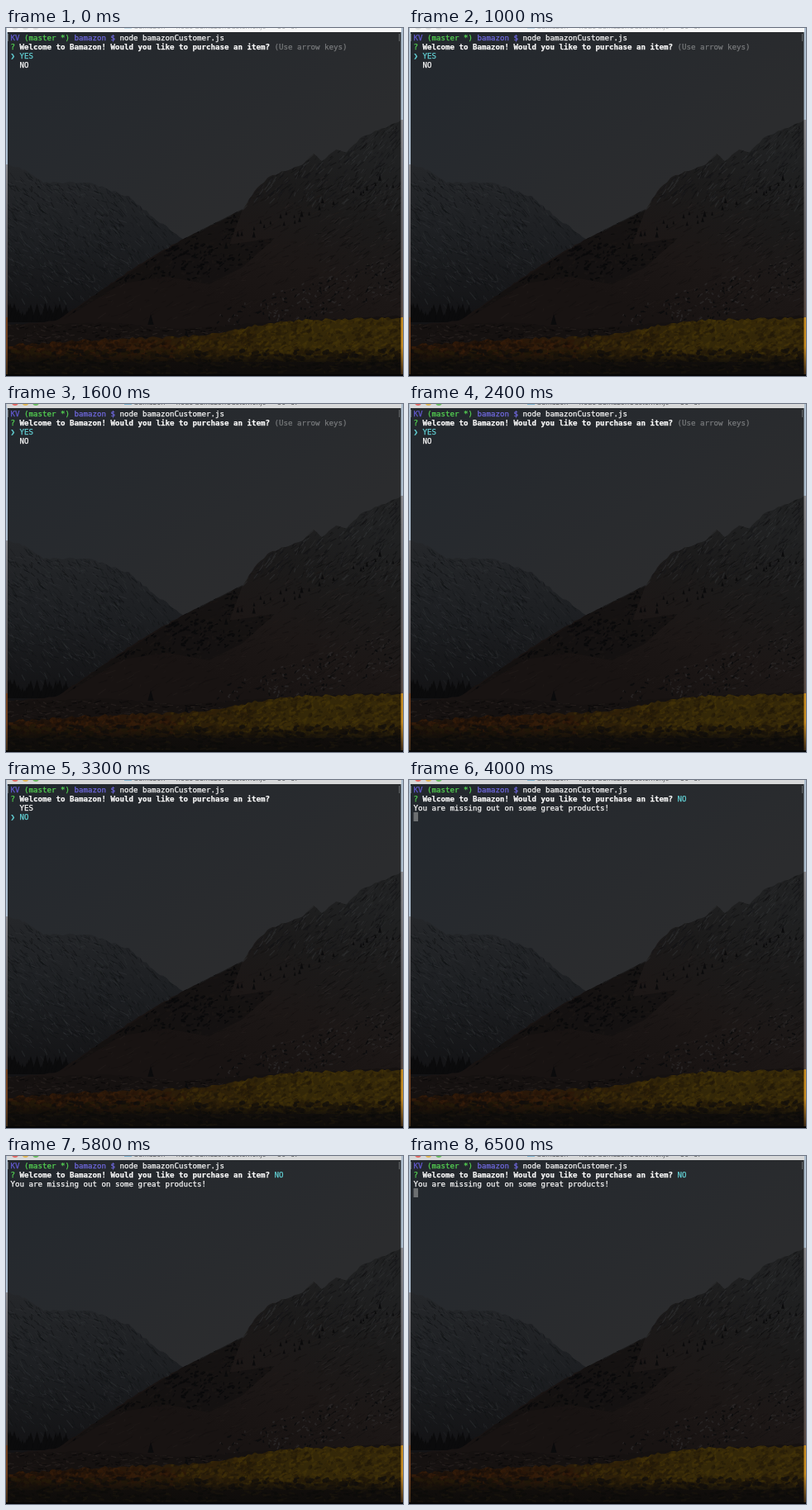
An HTML page with a canvas for the animation above (6.6 s loop, 480x421 px).

```html
<!DOCTYPE html>
<html lang="en">
<head>
<meta charset="utf-8">
<title>Terminal prompt</title>
<style>
html, body { margin: 0; width: 100%; height: 100%; overflow: hidden; background: #000; }
canvas { display: block; width: 480px; height: 421px; }
</style>
</head>
<body>
<canvas id="stage" width="480" height="421"></canvas>
<script>
const W = 480, H = 421, LOOP = 6600;
const FOCUSED = 1500, SELECT_NO = 2800, ANSWERED = 3600, BLINK = 1200;
const LEFT = 5.5, COL = 5.5, ROW = 11;
const GREEN = '#55d552', CYAN = '#62cfd3', WHITE = '#f8f8f8', GREY = '#77797b', VIOLET = '#7069e0';

const stage = document.getElementById('stage').getContext('2d');
const backdrop = document.createElement('canvas');
backdrop.width = W;
backdrop.height = H;
const art = backdrop.getContext('2d');

let seed = 11;
function random() {
  seed = (seed * 16807) % 2147483647;
  return seed / 2147483647;
}
const between = (a, b) => a + random() * (b - a);
const pick = list => list[Math.floor(random() * list.length)];

// A linear gradient with evenly spaced colours.
function blend(x0, y0, x1, y1, ...colors) {
  const gradient = art.createLinearGradient(x0, y0, x1, y1);
  colors.forEach((color, i) => gradient.addColorStop(i / (colors.length - 1), color));
  return gradient;
}

// Land below a jagged line through a few key points.
function land(keyPoints, roughness, floor = H) {
  const keys = keyPoints.split(' ').map(p => p.split(',').map(Number));
  const path = new Path2D();
  keys.forEach(([x, y], i) => {
    path.lineTo(x, y);
    const [nextX, nextY] = keys[i + 1] || [x, y];
    for (let px = x + 4; px < nextX; px += 4) {
      const t = (px - x) / (nextX - x);
      path.lineTo(px, y + (nextY - y) * t + between(-roughness, roughness));
    }
  });
  path.lineTo(W, floor);
  path.lineTo(0, floor);
  path.closePath();
  return path;
}

// Random strokes or dabs inside a box, clipped to a path.
function scatter(path, [x0, y0, x1, y1], count, colors, dx, dy, width) {
  art.save();
  art.clip(path);
  art.lineCap = 'round';
  for (let i = 0; i < count; i++) {
    const x = between(x0, x1), y = between(y0, y1), length = between(0.2, 1);
    art.strokeStyle = pick(colors);
    art.lineWidth = width * between(0.4, 1);
    art.beginPath();
    art.moveTo(x, y);
    art.lineTo(x + dx * length + between(-2, 2), y + dy * length + between(-2, 2));
    art.stroke();
  }
  art.restore();
}

function fir(x, base, height) {
  art.fillStyle = '#0b0b0c';
  art.beginPath();
  art.moveTo(x, base - height);
  art.lineTo(x + height * 0.28, base);
  art.lineTo(x - height * 0.28, base);
  art.fill();
}

function paintMountains() {
  art.fillStyle = blend(40, 0, 200, 260, '#23282e', '#272a2e', '#2b2c2e');
  art.fillRect(0, 0, W, H);

  const farRange = land('0,166 22,171 45,187 100,187 150,205 178,229 215,255 480,300', 1.5);
  art.fillStyle = blend(0, 165, 0, 350, '#25272a', '#1d1f22', '#131315');
  art.fill(farRange);
  scatter(farRange, [0, 170, 200, 335], 900, ['#2b2d3099', '#11131599', '#17191c99'], 6, 8, 1.3);
  scatter(farRange, [0, 180, 140, 310], 350, ['#34363a99', '#0d0f1199'], 9, 5, 0.9);
  for (let x = 0; x < 80; x += 2.5) fir(x, 356, between(8, 24));

  const ridge = land('0,360 60,354 95,331 160,286 215,255 286,220 300,198 318,180 360,164 372,152 382,161 399,147 412,150 430,132 480,111', 1);
  art.fillStyle = blend(390, 130, 300, 350, '#202122', '#1b1a1a', '#1c1716', '#181312');
  art.fill(ridge);
  scatter(ridge, [285, 112, 480, 215], 700, ['#30313399', '#0f101199', '#17171999'], -7, 8, 1.4);
  scatter(ridge, [100, 200, 480, 350], 700, ['#241e1c80', '#110f0f80', '#17131280'], -10, 5, 1.2);
  scatter(ridge, [380, 180, 480, 330], 260, ['#2a272799', '#0c0c0c99'], -8, 5, 1.2);
  for (let i = 0; i < 220; i++) {
    const x = between(255, 470), y = 440 - x * 0.3 + between(-22, 22);
    scatter(ridge, [x, y, x, y], 1, ['#0c0c0d', '#272424'], 2, -1, 2);
  }

  const woods = new Path2D('M70 352L110 321L215 255L286 219L270 262L325 254L285 290L245 310L195 301L140 309Z');
  art.fillStyle = '#110f0f99';
  art.fill(woods);
  scatter(woods, [70, 215, 325, 352], 1100, ['#09090a', '#0c0b0c', '#181413'], -4, 2, 2.6);
  for (let i = 0; i < 30; i++) {
    const x = between(215, 470);
    fir(x, 354 - x * 0.37 + between(-4, 14), between(4, 8));
  }
}

function paintMeadow() {
  const valley = land('0,359 130,357 210,364 320,356 480,348', 1);
  art.fillStyle = '#151110';
  art.fill(valley);
  scatter(valley, [0, 358, 260, 382], 300, ['#231d1b', '#0c0a0a', '#191413'], 6, 0, 1.5);
  fir(175, 359, 13);
  fir(218, 375, 10);

  const meadow = land('0,384 125,376 205,374 245,371 320,357 350,354 480,350', 2, 404);
  art.fillStyle = blend(0, 0, W, 0, '#1b110a', '#28170a', '#2b1e09', '#342808', '#352809');
  art.fill(meadow);
  scatter(meadow, [0, 378, 215, 400], 420, ['#3a1e0a88', '#170e0988', '#2c180988'], 4, -1, 4);
  scatter(meadow, [200, 366, 300, 400], 260, ['#40300988', '#1d150988', '#32210988'], 4, -2, 4);
  scatter(meadow, [280, 351, 480, 400], 750, ['#46360988', '#20180888', '#33270888'], 4, -2, 4);
  scatter(meadow, [0, 390, 480, 408], 420, ['#100d0bbb', '#1b1409bb', '#261b09bb'], 6, 0, 5);

  art.fillStyle = blend(0, 392, 0, 419, '#0f0c0a00', '#0f0c0acc', '#0e0c0a');
  art.fillRect(0, 392, W, 27);
  scatter(valley, [0, 401, 480, 418], 250, ['#0b0a0999', '#1a140c99'], 7, 0, 3);
}

// Slivers of the undimmed desktop beside the window.
function paintEdges() {
  const strip = (x, width, skyline, gold) => {
    art.fillStyle = '#aebfd0';
    art.fillRect(x, 0, width, skyline);
    art.fillStyle = blend(0, skyline, 0, 350, '#8b8c91', '#67666a', '#594b45');
    art.fillRect(x, skyline, width, 350 - skyline);
    art.fillStyle = blend(0, 350, 0, 419, gold, gold, '#3f2c17');
    art.fillRect(x, 350, width, 69);
  };
  strip(0, 2, 165, '#70401f');
  strip(477.5, 2.5, 111, '#c58b22');
  art.fillStyle = '#050505';
  art.fillRect(0, 419, W, 2);
}

function drawTitleBar(focused) {
  stage.fillStyle = focused ? '#d8d9da' : '#f6f7f8';
  stage.fillRect(1, 0, 477, 5);
  const lights = focused ? ['#e5665f', '#e2b650', '#68bd5d'] : ['#dcdddd', '#dcdddd', '#dcdddd'];
  lights.forEach((color, i) => {
    stage.fillStyle = color;
    stage.beginPath();
    stage.arc(11 + 12.5 * i, -2, 4, 0, 7);
    stage.fill();
  });
  stage.fillStyle = focused ? '#7fb3cf' : '#c5dce8';
  stage.fillRect(143, 0, 9, 1);
  stage.fillStyle = focused ? '#595b5d' : '#b0b2b4';
  stage.font = '8.6px Inter, sans-serif';
  stage.fillText('bamazon — node bamazonCustomer.js — 80×37', 155, 1);
}

function write(row, column, text, color, weight = 'normal') {
  stage.font = `${weight} 9.14px "DejaVu Sans Mono", monospace`;
  stage.fillStyle = stage.strokeStyle = color;
  stage.lineWidth = 0.25;
  [...text].forEach((char, i) => {
    const x = LEFT + (column + i) * COL, y = 15 + row * ROW;
    stage.fillText(char, x, y);
    stage.strokeText(char, x, y);
  });
}

function option(row, label, selected) {
  if (selected) write(row, 0, '❯', CYAN);
  write(row, 2, label, selected ? CYAN : WHITE);
}

function draw(time) {
  stage.drawImage(backdrop, 0, 0);
  drawTitleBar(time >= FOCUSED);

  stage.fillStyle = '#66696c';
  [2, 475].forEach(x => stage.fillRect(x, 7, 1, 9));
  write(0, 0, 'KV', '#6259cf');
  write(0, 3, '(master *)', GREEN);
  write(0, 14, 'bamazon $', VIOLET);
  write(0, 24, 'node bamazonCustomer.js', WHITE);
  write(1, 0, '?', GREEN);
  write(1, 2, 'Welcome to Bamazon! Would you like to purchase an item?', WHITE, 'bold');

  if (time < ANSWERED) {
    const no = time >= SELECT_NO;
    if (!no) write(1, 58, '(Use arrow keys)', GREY);
    option(2, 'YES', !no);
    option(3, 'NO', no);
    return;
  }
  write(1, 58, 'NO', CYAN);
  write(2, 0, 'You are missing out on some great products!', WHITE);
  if (Math.floor((time - ANSWERED) / BLINK) % 2 === 0) {
    stage.fillStyle = '#6c6f71';
    stage.fillRect(LEFT, 39, COL, ROW);
  }
}

paintMountains();
paintMeadow();
paintEdges();

const start = performance.now();
function tick() {
  draw((performance.now() - start) % LOOP);
  requestAnimationFrame(tick);
}
tick();
</script>
</body>
</html>
```
